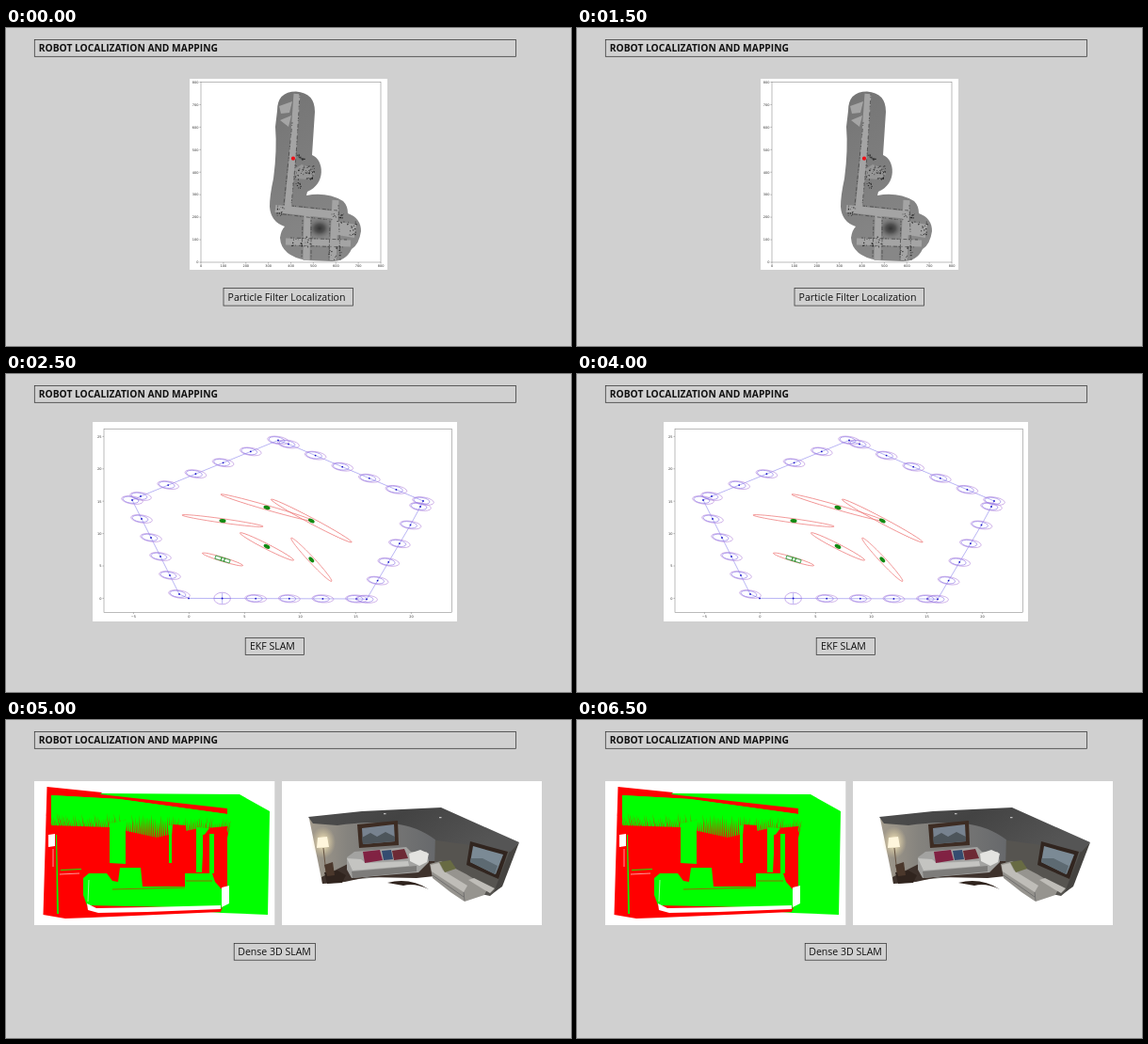
Recreate the animation shown at these times as an HTML page. Size 600 by 338 pixels, loop 7.5 s.

```html
<!DOCTYPE html>
<html lang="en">
<head>
<meta charset="utf-8">
<title>Robot Localization and Mapping</title>
<style>
html, body { margin: 0; height: 100%; overflow: hidden; background: #d0d0d0; }
svg { display: block; width: 100vw; height: 100vh; }
text { font-family: "Open Sans", "Noto Sans", sans-serif; font-size: 10.55px; fill: #111; }
.title { font-size: 10.28px; font-weight: 700; }
.tick { font: 3.5px "DejaVu Sans", sans-serif; fill: #333; }
.box { fill: none; stroke: #333; stroke-width: .75; }
.axes { fill: none; stroke: #777; stroke-width: .5; }
.slide { animation: show 7.5s step-end infinite; }
#ekf { animation-delay: -5s; }
#dense { animation-delay: -2.5s; }
@keyframes show { 0% { visibility: visible; } 33.3333%, 100% { visibility: hidden; } }
</style>
</head>
<body>
<svg viewBox="0 0 600 338" preserveAspectRatio="none">
  <defs>
    <linearGradient id="roof" x2="1" y2=".3"><stop stop-color="#4f4f4f"/><stop offset=".45" stop-color="#434343"/><stop offset="1" stop-color="#555"/></linearGradient>
    <linearGradient id="wall"><stop stop-color="#a39b8d"/><stop offset=".3" stop-color="#85837e"/><stop offset="1" stop-color="#66686b"/></linearGradient>
    <radialGradient id="glow"><stop stop-color="#fff3c8"/><stop offset="1" stop-color="#e8d3a0" stop-opacity="0"/></radialGradient>
    <radialGradient id="shade"><stop stop-color="#343434"/><stop offset=".4" stop-color="#505050"/><stop offset="1" stop-color="#777" stop-opacity="0"/></radialGradient>
    <linearGradient id="side" x2=".3" y2="1"><stop stop-color="#747474"/><stop offset="1" stop-color="#878787"/></linearGradient>
  </defs>
  <rect width="600" height="338" fill="#d0d0d0"/>
  <rect class="box" x="30.3" y="12.5" width="511.2" height="17.8"/>
  <text class="title" x="34.7" y="25">ROBOT LOCALIZATION AND MAPPING</text>

  <g id="particle" class="slide">
    <rect x="195" y="54" width="210" height="203" fill="#fff"/>
    <path fill="url(#side)" d="M288 88Q288 67.500 308 67.500Q328 69 328 89L325 135C338 140 340 166 320 174L319 178Q341 174 358 184Q363 189 363 197Q377 202 377 216Q375 230 367 235Q361 248 346 248L319 247Q292 242 291 223Q292 215 296 211Q281 206 280 190Q280 178 284 160Q288 130 286 105Z"/>
    <path fill="#a5a5a5" d="M290 83L304 78 301 90 292 91ZM291 98L303 93 300 105Z"/>
    <ellipse cx="333" cy="213" rx="13" ry="11" fill="url(#shade)"/>
    <g fill="none" stroke="#a4a4a4">
      <path stroke-width="7" d="M309 70L304 140 299 194"/>
      <path stroke-width="8" d="M286 192L352 199"/>
      <path stroke-width="7" d="M320 198L319 247M350 183L347 247M297 227L366 229"/>
      <path stroke-width="14" d="M347 212L371 216"/>
    </g>
    <path fill="#969696" d="M306 150L314 145 325 149 328 156 321 161 308 160Z"/>
    <path fill="none" stroke="#333" stroke-width=".6" stroke-dasharray="2 1 1 3 4 1.5" d="M304 100L300 140 295 188M312 70L308 136 303 188M287 197L344 204M304 189L352 194M315 204L314 244M324 204L324 246M344 205L343 247M353 188L355 247M302 223L362 225M304 231L360 233"/>
    <g id="specks" fill="#222"></g>
    <circle cx="305" cy="138.700" r="2.1" fill="#f01018"/>
    <rect class="axes" x="207" y="57.500" width="191" height="191.500"/>
    <g id="ticks1"></g>
    <rect class="box" x="231" y="276.400" width="137.600" height="18.700"/>
    <text x="235.600" y="289.500">Particle Filter Localization</text>
  </g>

  <g id="ekf" class="slide">
    <rect x="92" y="51" width="387" height="212" fill="#fff"/>
    <rect class="axes" x="104" y="58.300" width="369.700" height="195.200"/>
    <g id="ticks2"></g>
    <g id="track" fill="none" stroke-width=".6"></g>
    <g id="marks"></g>
    <rect class="box" x="254.200" y="280.400" width="62.200" height="18"/>
    <text x="258.900" y="293">EKF SLAM</text>
  </g>

  <g id="dense" class="slide">
    <rect x="30" y="65" width="255.300" height="153" fill="#fff"/>
    <path fill="#0f0" d="M46 77L105 78 248 79 280 97 278 207 229 205 205 203 80 202 45 160Z"/>
    <path fill="#f00" d="M43.500 71L102 77 100 79 235 94 235 100 120 84 48 80 48 160 235 165 230 198 228 204 90 210 63 211 39.500 207Z"/>
    <path fill="#0f0" d="M48 80L120 84 235 100 235 128 48 128Z"/>
    <path fill="#f00" d="M48 112L110 114 160 125 200 116 235 113 235 178 48 178Z"/>
    <path id="rays" fill="#f00"/>
    <g fill="#0f0">
      <path d="M110 110L127 107 127 153 110 152ZM173 112L176 112 176 152 173 152ZM202 114L216 115 210 123 208 162 202 162ZM216 121L221 121 221 163 216 163Z"/>
      <path d="M82 168L88 163 107 163 113 171 119 172 121 157 143 157 145 177 190 177 190 163 219 163 222 172 229 180 229 200 86 197 82 186Z"/>
      <path d="M53 122L54 122 56 206 54 206ZM58 159L80 158 80 159 58 160Z"/>
    </g>
    <path fill="#f00" d="M177 111L191 112 191 152 177 152ZM209 122L216 121 216 149 209 149Z"/>
    <path fill="none" stroke="#f00" stroke-width=".6" d="M113 180L190 178M191 171L219 171"/>
    <path fill="#fff" d="M45 122L52 121 52 134 45 135ZM229 178L237 176 237 195 229 199ZM86 195L96 200 150 199 228 197 228 201 150 204 98 205 87 202Z"/>
    <path fill="none" stroke="#fff" stroke-width=".6" d="M50 137L50 156M57 164L78 163M88 170L87 193"/>

    <rect x="293" y="65" width="276" height="153" fill="#fff"/>
    <path fill="url(#wall)" d="M322 105L350 110 430 108 458 126 456 158 428 164 365 170 336 174Z"/>
    <path fill="#3e322c" d="M335 167L363 153 438 150 456 150 455 166 436 168 383 167 360 172 336 174Z"/>
    <path fill="#565450" d="M456 122L536 138 543 132 525 178 514 187 490 182 455 158Z"/>
    <path fill="#454340" d="M535 139L545 130 527 177 518 183Z"/>
    <path fill="url(#roof)" d="M321 103L378 97 462 93 545 130 536 140 486 132 457 128Q436 112 410 110 378 108 352 112L326 110Z"/>
    <path fill="#bbb" d="M401 99h2.500v1.200h-2.500ZM460 103h2.500v1.200h-2.500Z"/>
    <ellipse cx="337" cy="130" rx="13" ry="17" fill="url(#glow)"/>
    <path fill="#fff6dc" d="M331 125L341 124 343 135 330 136Z"/>
    <path fill="none" stroke="#655342" d="M337 136L340 163"/>
    <path fill="#3d2c23" d="M373 111L416 107 417 133 375 136Z"/>
    <path fill="#77828f" d="M378 115L412 111 413 129 379 132Z"/>
    <path fill="#4d555b" d="M378 125L387 120 394 124 403 119 413 124 413 129 379 132Z"/>
    <path fill="#a3a3a1" d="M362 146L370 140 425 135 430 140 447 140 449 151 438 162 367 168 362 159Z"/>
    <path fill="#c4c4c1" d="M362 147L377 148 382 152 427 150 428 155 368 160Z"/>
    <path fill="#e3e3e0" d="M428 142L440 138 449 142 447 151 439 155 429 150Z"/>
    <path fill="#7d7c7a" d="M367 161L436 155 436 161 368 168Z"/>
    <path fill="#812243" d="M379 140L397 138 400 149 381 152Z"/>
    <path fill="#344c70" d="M399 139L409 138 411 148 401 149Z"/>
    <path fill="#6d2a35" d="M410 139L423 137 427 147 412 149Z"/>
    <path fill="#30241e" d="M338 162L352 160 361 165 357 173 341 174ZM405 173Q429 167 449 180Q434 173 422 176Z"/>
    <path fill="#4b382c" d="M338 154L347 151 349 165 341 166Z"/>
    <path fill="#31251f" d="M493 129L533 140 523 169 489 154Z"/>
    <path fill="#7b8a95" d="M496 134L528 143 520 164 493 151Z"/>
    <path fill="#5d6a72" d="M494 147L506 147 522 155 519 164 493 151Z"/>
    <path fill="#96948f" d="M450 153L462 150 489 164 512 178 508 186 487 193 472 183 453 168Z"/>
    <path fill="#bfbdb8" d="M451 154L460 152 464 160 490 176 486 183 452 161ZM491 170L497 168 519 179 514 184 507 180Z"/>
    <path fill="#686b43" d="M460 151L472 149 478 158 466 162Z"/>
    <path fill="none" stroke="#666" stroke-width=".8" d="M453 165L486 188M486 183L487 192"/>
    <rect class="box" x="242.200" y="237.400" width="86.400" height="17.800"/>
    <text x="246.200" y="250">Dense 3D SLAM</text>
  </g>
</svg>
<script>
const NS = 'http://www.w3.org/2000/svg';
const $ = id => document.getElementById(id);

function add(parent, tag, attrs, text) {
  const el = document.createElementNS(NS, tag);
  for (const k in attrs) el.setAttribute(k, attrs[k]);
  if (text !== undefined) el.textContent = text;
  parent.appendChild(el);
  return el;
}

function label(g, x, y, n, anchor) {
  add(g, 'text', { class: 'tick', x, y, 'text-anchor': anchor }, String(n).replace('-', '\u2212'));
}

function xTick(g, x, y, n) {
  add(g, 'path', { class: 'axes', d: `M${x} ${y}v1.5` });
  label(g, x, y + 5.3, n, 'middle');
}

function yTick(g, x, y, n) {
  add(g, 'path', { class: 'axes', d: `M${x} ${y}h-1.5` });
  label(g, x - 2.6, y + 1.3, n, 'end');
}

for (let i = 0; i <= 8; i++) {
  xTick($('ticks1'), 207 + i * 23.88, 249, i * 100);
  yTick($('ticks1'), 207, 249 - i * 23.94, i * 100);
}
for (let n = -5; n <= 20; n += 5) xTick($('ticks2'), 194.4 + n * 11.8, 253.5, n);
for (let n = 0; n <= 25; n += 5) yTick($('ticks2'), 104, 238.4 - n * 6.88, n);

// Seeded noise for wall fragments
let seed = 7;
const rnd = () => (seed = seed * 16807 % 2147483647) / 2147483647;

function scatter(count, x, y, w, h) {
  for (let i = 0; i < count; i++) {
    add($('specks'), 'rect', {
      x: x + rnd() * w, y: y + rnd() * h,
      width: .4 + rnd(), height: .4 + rnd()
    });
  }
}
scatter(60, 306, 146, 21, 15);
scatter(14, 307, 134, 10, 6);
scatter(12, 304, 164, 9, 7);
scatter(20, 345, 197, 14, 10);
scatter(20, 362, 205, 10, 17);
scatter(14, 287, 188, 8, 13);
scatter(20, 303, 221, 23, 12);
scatter(18, 341, 231, 15, 15);

// Robot path: corners with the number of steps up to each
const poses = [[194, 238.4]];
function leg(x, y, steps) {
  const [a, b] = poses[poses.length - 1];
  for (let i = 1; i <= steps; i++) poses.push([a + (x - a) * i / steps, b + (y - b) * i / steps]);
}
leg(372, 239, 5);
leg(383, 239.3, 1);
leg(429.5, 160.5, 4);
leg(440, 141, 1);
leg(443, 135, 1);
leg(300, 74.5, 5);
leg(289, 70.5, 1);
leg(143, 130, 5);
leg(134, 134, 1);
leg(184, 234, 5);

const track = $('track');
add(track, 'path', { d: 'M' + poses.join('L') + 'Z', stroke: '#8a84ed' });
poses.forEach(([cx, cy], i) => {
  if (i === 1) {
    add(track, 'ellipse', { cx, cy, rx: 8.8, ry: 6.3, stroke: '#a67be0' });
    add(track, 'path', { d: `M${cx - 9} ${cy}h18M${cx} ${cy - 6}v12`, stroke: '#8a84ed' });
  } else if (i) {
    const turn = i < 7 ? 3 : 9;
    const ring = (dx, rx, ry, stroke) => add(track, 'ellipse', {
      cx: cx + dx, cy, rx, ry, stroke, transform: `rotate(${turn} ${cx} ${cy})`
    });
    ring(0, 11.5, 4.1, '#b58add');
    ring(-1.5, 8.5, 3.4, '#8d75e6');
  }
  add(track, 'circle', { cx, cy, r: .9, fill: '#1616c8' });
});

// Landmarks: centre, half length, half width, angle
[[277, 142, 51, 2.4, 16], [230, 156, 43.5, 2.2, 8], [324.3, 156, 48.5, 3, 28],
 [277, 183.4, 32, 2.8, 27], [324.3, 197.3, 31.5, 3, 47], [230, 197, 22.5, 2.2, 17]
].forEach(([cx, cy, rx, ry, a], i) => {
  const g = add($('marks'), 'g', { transform: `translate(${cx} ${cy}) rotate(${a})` });
  add(g, 'ellipse', { rx, ry, fill: 'none', stroke: '#ee7777', 'stroke-width': .7 });
  if (i < 5) {
    add(g, 'ellipse', { rx: 3.6, ry: 2, fill: '#128a12' });
  } else {
    add(g, 'rect', { x: -8, y: -1.7, width: 16, height: 3.4, fill: '#fff', stroke: '#2c9a3c', 'stroke-width': .8 });
    add(g, 'path', { d: 'M-1.5 -2v4M2 -2v4', stroke: '#128a12' });
  }
});

// Comb of rays, leaning outward, where the two scans interleave
let comb = '';
for (let x = 48; x < 234; x += 1.8) {
  const top = 96 + (x - 48) * .04 + rnd() * 9;
  const lean = (x - 155) * .06;
  comb += `M${x} 127L${x + lean + .6} ${top}L${x + 1.3} 127Z`;
}
$('rays').setAttribute('d', comb);
</script>
</body>
</html>
```
